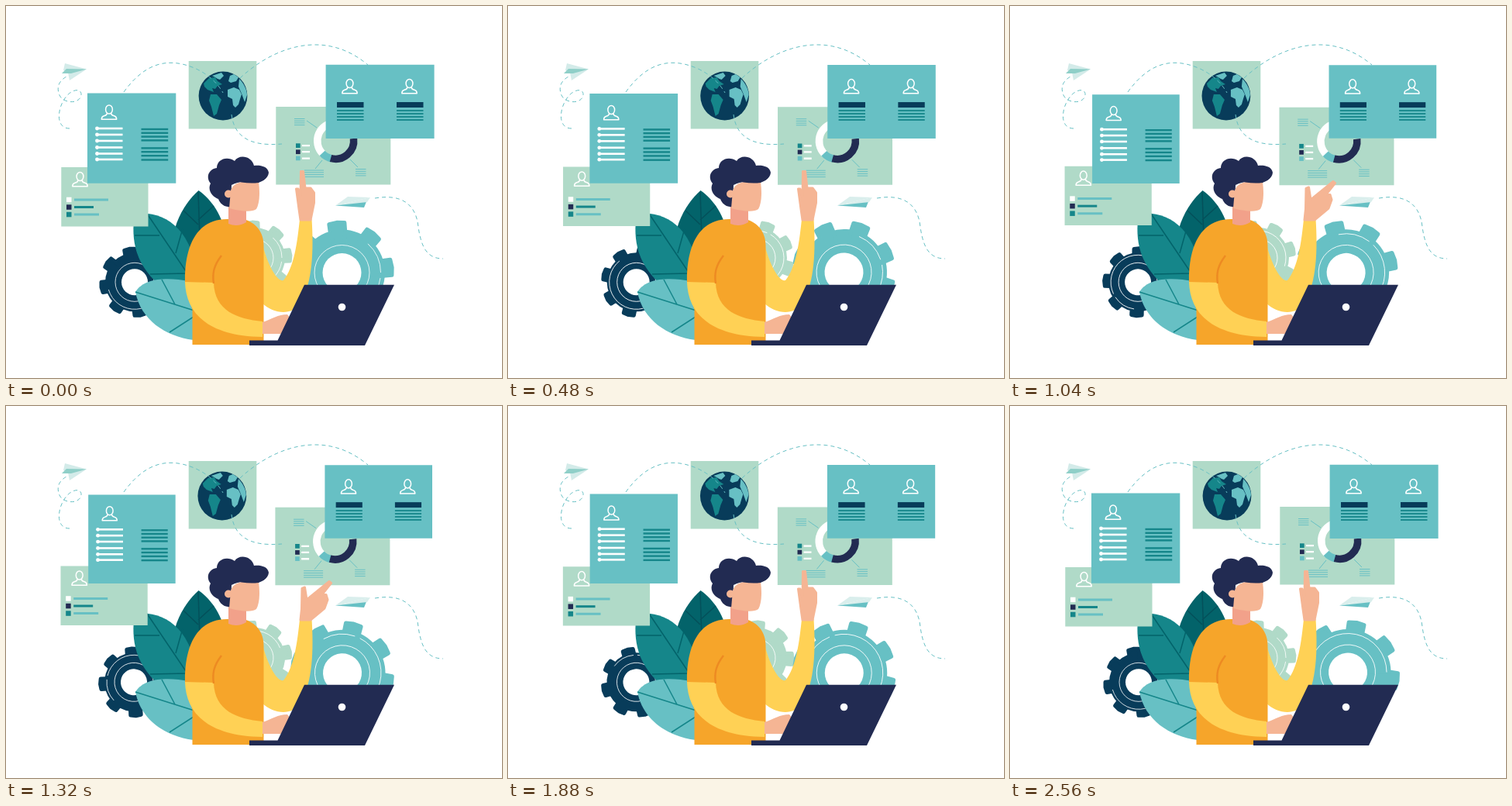
Animation, 640 px wide and 480 px high, one loop 2.6 s. Source, as an HTML page:

```html
<!DOCTYPE html>
<html lang="en">
<head>
<meta charset="utf-8">
<title>Working with data</title>
<style>
html, body { margin: 0; width: 100%; height: 100%; overflow: hidden; background: #fff; }
svg { display: block; width: 100%; height: 100%; }
.teal { fill: #67c0c4; } .mint { fill: #b0dac8; } .navy { fill: #222b52; } .deep { fill: #083c5a; }
.pine { fill: #15868a; } .forest { fill: #03636a; } .skin { fill: #f5b594; } .white { fill: #fff; }
.orange { fill: #f6a52a; } .yellow { fill: #ffd155; }
.line { fill: none; stroke: #67c0c4; stroke-width: 1; }
.dash { stroke-dasharray: 5 4; }
.thin { fill: none; stroke: #fff; stroke-width: 0.8; }
.icon { fill: none; stroke: #fff; stroke-width: 1.5; stroke-linejoin: round; }
.vein { fill: none; stroke: #15868a; stroke-width: 1.5; }
.dark { stroke: #03636a; }
.darkest { stroke: #04505a; }
</style>
</head>
<body>
<svg viewBox="0 0 640 480">
<defs>
  <g id="user" class="icon">
    <ellipse cy="-3" rx="4.4" ry="5.6"/>
    <path d="M-2.6 1.8Q-3 4.500-6.500 5.300Q-9.700 6.300-9.700 9.700H9.700Q9.700 6.300 6.500 5.300Q3 4.500 2.600 1.800"/>
  </g>
</defs>

<g id="gears"></g>

<path class="forest" d="M248.500 238C263 248 278 268 281 288L262 345L215 310C214 284 230 254 248.500 238Z"/>
<path class="vein darkest" d="M248 240L250 300M248 276L268 258M248 282L229 264"/>
<path class="pine" d="M166 268C205 263 241 288 247 352L205 366C166 336 161 302 166 268Z"/>
<path class="vein dark" d="M182 268L234 345M166 296H198M228 287L219 319M186 346L233 345"/>
<path class="teal" d="M167 369C178 350 210 350 236 355L262 380L242 431C205 426 174 405 167 369Z"/>
<path class="vein" d="M167 369L243 393M201 353L218 385M211 421L242 401"/>

<g id="listCard">
  <path class="mint" d="M71.3 208h112.2v76.4H71.3z"/>
  <use href="#user" x="95.5" y="223"/>
  <path class="white" d="M78 246.7h6.5v6.5H78z"/>
  <path class="navy" d="M78 256.3h6.5v6.5H78z"/>
  <path class="pine" d="M78 265.8h6.5v6.5H78z"/>
  <path class="teal" d="M88 248.4h44v3H88zM88 267.6h32v3H88z"/>
  <path class="pine" d="M88 258h25v3H88z"/>
</g>
<g id="profileCard">
  <path class="teal" d="M105 112.4h114.3v116.4H105z"/>
  <use href="#user" x="133" y="136.5"/>
  <g id="bullets"></g>
</g>

<path class="mint" d="M235.7 71h87.6v87.6h-87.6z"/>
<g id="globe">
  <circle class="deep" cx="280" cy="116" r="31.4"/>
  <path class="pine" d="M255 100L262 93L270 92L273 97L279 101L273 103L270 107L266 106L268 111L260 108L256 104ZM264 114L272 114L278 121L275 128L272 139L268 142L265 130L262 122Z"/>
  <path class="teal" d="M266 90L278 86L281 90L276 95L273 94L270 92ZM286 108L294 105L301 108L304 114L302 120L300 127L296 131L293 128L292 120L286 117ZM287 97L289 90L294 88L300 92L297 97L290 99ZM301 94C306 99 311 107 311 115L308 124L304 113L300 104Z"/>
</g>

<g id="chartCard">
  <path class="mint" d="M348.3 130h148v100.5h-148z"/>
  <g fill="none" stroke-width="9.5">
    <path stroke="#fff" d="M426 150.5A23.5 23.5 0 0 0 409 191"/>
    <path stroke="#67c0c4" d="M408 190A23.5 23.5 0 0 0 420 196.8"/>
    <path stroke="#222b52" d="M419 196.5A23.5 23.5 0 0 0 448.5 171"/>
  </g>
  <path class="pine" d="M374 177.3h5.7v5.7H374z"/>
  <path class="navy" d="M374 185.4h5.7v5.7H374z"/>
  <path class="teal" d="M374 193.6h5.7v5.7H374z"/>
  <path class="white" d="M382 179h10v2.3H382zM382 187h10v2.3H382zM382 195.4h10v2.3H382z"/>
  <path class="line" d="M388 148L401 157M399 210L408 199M444 198L454 208M372 145.5h13.5m-13.5 2.7h13.5m-13.5 2.7h13.5m-13.5 2.7h13.5M385 212h25m-25 2.8h25m-25 2.8h25m-25 2.8h25M451 210.5h13.5m-13.5 2.8h13.5m-13.5 2.8h13.5m-13.5 2.8h13.5"/>
</g>

<g class="line dash">
  <path d="M152 111C178 75 207 65 243 80Q268 91 280 112"/>
  <path d="M302 93C344 54 410 28 467 76"/>
  <path d="M291 140C294 165 310 182 356 178"/>
  <path d="M82 158C64 158 66 133 76 119C85 106 98 106 97 115C95 127 74 126 69 115C64 103 70 95 80 90"/>
  <path d="M476 248C511 242 529 256 532 285C536 314 545 326 564 326"/>
</g>

<g id="teamCard">
  <path class="teal" d="M412.6 75.7h140V171h-140z"/>
  <g id="members"></g>
</g>

<path fill="#d3ebe9" d="M76 74L104 81.500L82 96L80 86L74 83Z"/>
<path fill="#8fcfc8" d="M72 87L78 81L104 81.500L84 87Z"/>
<path fill="#d9eeec" d="M425 257.5L441 246L470 247Z"/>
<path class="teal" d="M425 257.5L466 250L462 260Z"/>
<path fill="#d9eeec" d="M425 257.5L470 247L466 253Z"/>

<path class="yellow" d="M330 304C338 336 350 356 358 354C372 337 376 304 379 275H394.500C397 315 396 355 380 385C368 399 346 398 330 383Z"/>
<path id="hand" class="skin" stroke="#f5b594" stroke-width="3" stroke-linejoin="round"/>
<path class="orange" d="M240.500 437V392L231 357C230 312 245 275 285 275H306C322 279 332.500 291 332.500 309V437Z"/>
<path class="skin" d="M331 408C343 404 351 398 363 398L367 403L355 423H331Z"/>
<path class="yellow" d="M231 356C232 396 260 426 331 427V407C298 404 269 393 268 357Z"/>
<path d="M278 322C268 335 266 345 268 358" fill="none" stroke="#ed8a22" stroke-width="2.4"/>
<path fill="#f2a18a" d="M287 255H310V279Q299 286 287 281Z"/>
<path class="navy" d="M339 215C338 207 328 205 320 206C317 193 300 191 295 200C285 193 272 198 272 209C262 210 257 221 264 229C259 239 268 247 274 249C277 257 284 260 290 259L291 231Q302 225 316 228C328 229 338 224 339 215Z"/>
<path class="skin" d="M290 238Q294 223 326 227C328 242 327 255 323 262Q315 268 288 261Z"/>
<circle class="skin" cx="287" cy="242.500" r="5"/>
<path class="navy" d="M292 224H333L326 228Q308 230 291 224Z"/>
<path class="navy" d="M385 359.700H501L463 438H314V431.500H350.500Z"/>
<circle class="white" cx="433.500" cy="388.500" r="4.800"/>
</svg>

<script>
const $ = id => document.getElementById(id);
const rect = (cls, x, y, w, h) => `<rect class="${cls}" x="${x}" y="${y}" width="${w}" height="${h}"/>`;

$('bullets').innerHTML =
  [158, 166, 174, 182.5, 190.5, 198].map(y =>
    rect('white', 117, y - 1.3, 33.5, 2.6) + `<circle class="white" cx="117.5" cy="${y}" r="2.4"/>`).join('') +
  [159, 163.8, 168.6, 173.4, 183.4, 188.2, 193.2, 198.5].map(y => rect('pine', 174.5, y - 1.2, 34.7, 2.4)).join('');

$('members').innerHTML = [427, 504].map(x =>
  `<use href="#user" x="${x + 16.5}" y="103"/>` + rect('deep', x, 124, 34.5, 7) +
  [135, 139, 143, 147].map(y => rect('pine', x, y - 0.9, 34.5, 1.8)).join('')).join('');

const polar = (r, deg) => {
  const a = deg * Math.PI / 180;
  return `${(r * Math.cos(a)).toFixed(2)} ${(r * Math.sin(a)).toFixed(2)}`;
};
const arc = (r, from, to) =>
  `M${polar(r, from)}A${r} ${r} 0 ${to - from > 180 ? 1 : 0} 1 ${polar(r, to)}`;

// Eight-toothed gear centred on 0,0 with one tooth at `phase` degrees.
function addGear(id, cls, color, root, tip, hole, ring, band, phase) {
  let teeth = '';
  for (let a = phase; a < phase + 360; a += 45) {
    teeth += `M0 0L${polar(root - 2, a - 10.5)}L${polar(tip - 3, a - 9)}L${polar(tip - 2.5, a)}` +
      `L${polar(tip - 3, a + 9)}L${polar(root - 2, a + 10.5)}Z`;
  }
  $('gears').innerHTML += `<g id="${id}"><circle class="${cls}" r="${root}"/>
    <path class="${cls}" d="${teeth}" stroke="${color}" stroke-width="5" stroke-linejoin="round"/>
    <circle class="white" r="${hole}"/><circle class="thin" r="${ring}"/>
    <path class="thin" d="${arc(band, -48, 0)}${arc(band, 8, 164)}"/></g>`;
}
addGear('darkGear', 'deep', '#083c5a', 38, 46, 17, 25, 35, 36);
addGear('mintGear', 'mint', '#b0dac8', 39, 48.5, 14, 24, 35, -4);
addGear('tealGear', 'teal', '#67c0c4', 55.5, 67.5, 25, 35.5, 50, -6);

// Step, angle, centre x, centre y
const tealKeys = [
  [0, 0, 433.5, 344], [12, -19, 433.5, 343.5], [20, -38, 433.3, 343.5], [33, -71, 434, 344.3],
  [40, -90, 433.3, 343.7], [54, -134, 434.2, 345], [64, -164, 436, 343.5]
];
const handUp = [380,276, 378,262, 374.5,236, 377,236, 380,248, 380.5,213.5, 383.5,213.5, 386,235, 393,235, 397.5,241, 397.5,254, 393,276];
const handSide = [380,276, 381.5,262, 382,235.5, 385.5,234, 388,250, 417,226.5, 419.5,228.5, 408,243, 413,243.5, 415,250, 411,261, 393,276];

const mix = (a, b, p) => a.map((v, i) => v + (b[i] - v) * p);
const smooth = (from, to, t) => {
  const u = Math.min(1, Math.max(0, (t - from) / (to - from)));
  return u * u * (3 - 2 * u);
};
const place = (id, transform) => $(id).setAttribute('transform', transform);
const scaleAt = (x, y, s) => `translate(${x} ${y}) scale(${s}) translate(${-x} ${-y})`;

function draw(now) {
  const step = Math.floor(now % 2600 / 40), t = step * 40;
  const turn = step * 360 / 64;
  const drift = (1 - Math.cos(step * Math.PI / 32)) / 2;

  place('listCard', `translate(${-0.8 * drift} ${-1.5 * drift})`);
  place('profileCard', scaleAt(180, 240, 1 - 0.016 * drift));
  place('globe', `translate(${-1.2 * drift} 0)`);
  place('chartCard', `translate(${-0.9 * drift} ${0.7 * drift})`);
  place('teamCard', scaleAt(292, 140, 1 - 0.01 * drift));

  place('darkGear', `translate(${166 - drift} 356.3) rotate(${turn})`);
  place('mintGear', `translate(321 325) rotate(${-turn})`);
  const next = tealKeys.findIndex((k, i) => i && step <= k[0]);
  const a = tealKeys[next - 1], b = tealKeys[next];
  const [, angle, x, y] = mix(a, b, (step - a[0]) / (b[0] - a[0]));
  place('tealGear', `translate(${x} ${y}) rotate(${angle})`);

  const point = smooth(500, 790, t) - smooth(1350, 1690, t);
  $('hand').setAttribute('d', `M${mix(handUp, handSide, point).join(' ')}Z`);
  requestAnimationFrame(draw);
}
draw(0);
</script>
</body>
</html>
```
